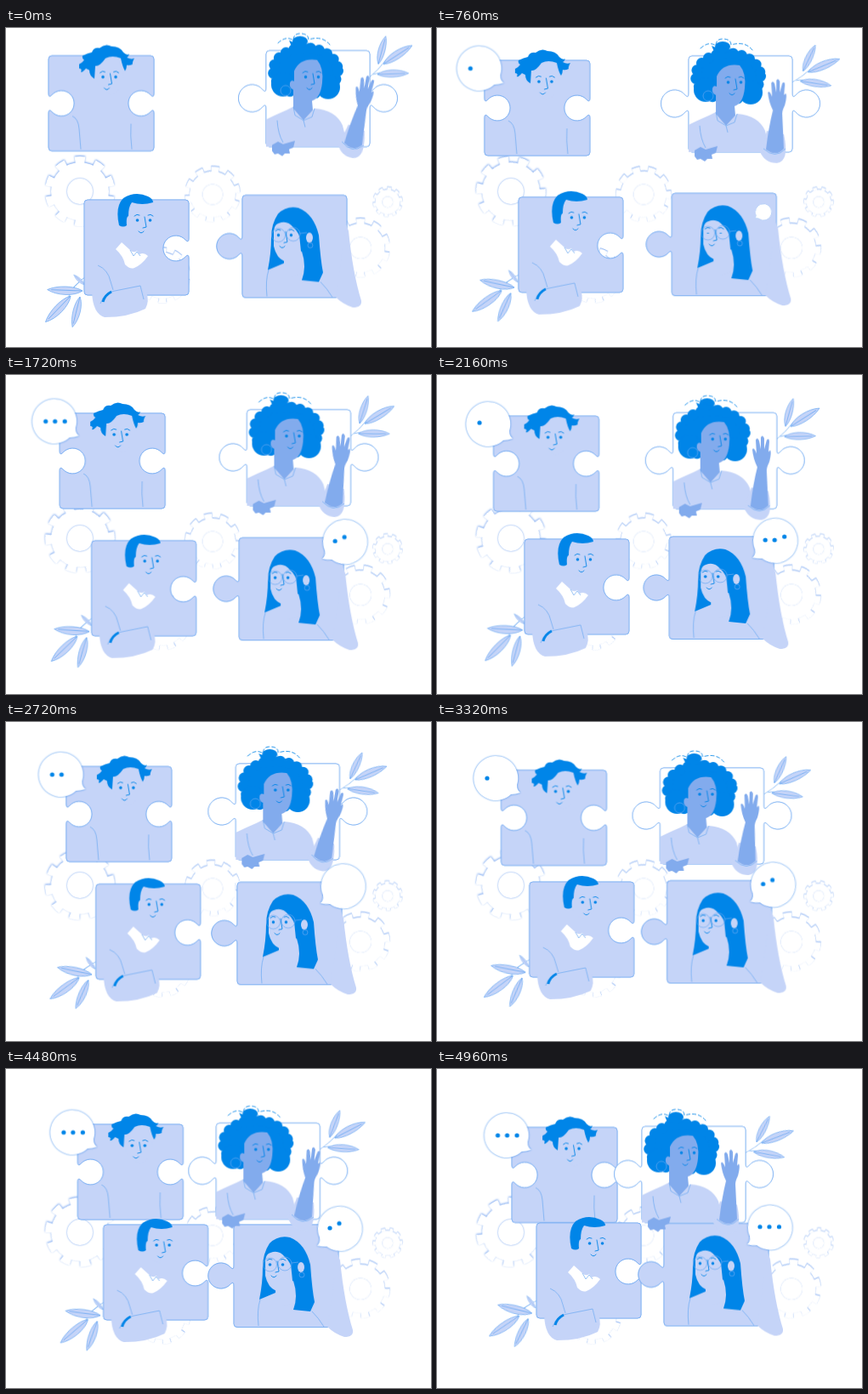
An HTML page without scripts that plays this animation: 500x375 px, repeating every 5000 ms.

```html
<!DOCTYPE html>
<html lang="en">
<head>
<meta charset="utf-8">
<title>Puzzle team</title>
<style>
  :root { --light: #c5d4f8; --skin: #82abed; --blue: #0085e8; --edge: #6aa9f3; --shade: #79a6f0; }
  html, body { margin: 0; height: 100%; overflow: hidden; background: #fff; }
  svg { display: block; width: 100vw; height: 100vh; }

  .light { fill: var(--light); }
  .skin { fill: var(--skin); }
  .hair { fill: var(--blue); }
  .white { fill: #fff; }
  .line { fill: none; stroke: var(--blue); stroke-width: .9; stroke-linecap: round; stroke-linejoin: round; }
  .thin { fill: none; stroke: var(--edge); stroke-width: .7; }
  .piece { stroke: var(--edge); stroke-width: .7; filter: drop-shadow(0 0 .5px var(--shade)); }
  .leaf { fill: var(--light); stroke: var(--edge); stroke-width: .6; }
  .gear { filter: drop-shadow(.5px -.8px .8px var(--shade)); }
  .hub { fill: #fff; filter: drop-shadow(.6px .6px .9px var(--shade)); }
  .bubble { fill: #fff; filter: drop-shadow(0 0 .8px #2f83ea); }

  /* Each piece drifts from its start toward the assembled puzzle. */
  .drift { animation: drift 5s linear infinite; }
  @keyframes drift { to { transform: translate(var(--dx), var(--dy)); } }

  .spin { animation: spin 5s linear infinite; }
  .back { animation-direction: reverse; }
  @keyframes spin { to { transform: rotate(150deg); } }

  .sway { animation: sway 5s cubic-bezier(.37, 0, .63, 1) infinite; }
  @keyframes sway {
    0%, 40%, 80% { transform: none; }
    20%, 60%, 100% { transform: rotate(12deg); }
  }

  .wave { transform-origin: 100px 115px; animation: wave 5s cubic-bezier(.37, 0, .63, 1) infinite; }
  @keyframes wave {
    0%, 28%, 56%, 84% { transform: rotate(10deg); }
    14%, 42%, 70%, 98%, 100% { transform: none; }
  }

  .blink { animation: blink 5s var(--at) infinite; }
  @keyframes blink {
    0%, 3.2% { transform: scaleY(.25); }
    3.21%, 100% { transform: none; }
  }

  .pop-early { transform-origin: 27px 18px; animation: pop-early 5s ease-out infinite; }
  .pop-late { transform-origin: -26px 28px; animation: pop-late 5s linear infinite; }
  @keyframes pop-early { 0%, 1% { transform: scale(0); } 7%, 100% { transform: none; } }
  @keyframes pop-late { 0%, 13.4% { transform: scale(0); } 18.4%, 100% { transform: none; } }

  /* Dots drop in one after another, then clear together. */
  .dots circle { fill: var(--blue); animation: dot1 5s linear infinite; }
  .dots circle:nth-child(2) { animation-name: dot2; }
  .dots circle:nth-child(3) { animation-name: dot3; }
  .dots.late circle { animation-delay: -4.16s; }
  .late { animation: reveal 5s step-end infinite; }
  @keyframes reveal { 0% { opacity: 0; } 20% { opacity: 1; } }
  @keyframes dot1 {
    0%, 35%, 63.8% { opacity: 0; animation-timing-function: step-end; }
    9%, 41%, 64.4% { opacity: 1; transform: translateY(-6px); }
    12%, 34.99%, 44%, 63.79%, 66%, 100% { opacity: 1; transform: none; }
  }
  @keyframes dot2 {
    0%, 35%, 63.8% { opacity: 0; animation-timing-function: step-end; }
    17%, 49%, 72.6% { opacity: 1; transform: translateY(-6px); }
    20%, 34.99%, 52%, 63.79%, 75.6%, 100% { opacity: 1; transform: none; }
  }
  @keyframes dot3 {
    0%, 35%, 63.8% { opacity: 0; animation-timing-function: step-end; }
    25.4%, 57%, 80.2% { opacity: 1; transform: translateY(-6px); }
    28.4%, 34.99%, 60%, 63.79%, 82.2%, 100% { opacity: 1; transform: none; }
  }
</style>
</head>
<body>
<svg viewBox="0 0 500 375">
  <defs>
    <g id="gear">
      <circle class="white" r="34"/>
      <circle r="37" fill="none" stroke="#fff" stroke-width="8" pathLength="20" stroke-dasharray="1 1" stroke-dashoffset=".5" transform="rotate(-90)"/>
    </g>
    <circle id="hub" class="hub" r="15"/>

    <g id="leaf">
      <path class="leaf" d="M0 0C8-6 26-6 36 0C26 5 8 5 0 0Z"/>
      <path class="thin" d="M0 0H32"/>
    </g>

    <g id="eyes" class="hair"><circle cx="-7.5" r="1.8"/><circle cx="7.5" r="1.8"/></g>
    <path id="features" class="line" d="M-11-5q3-3 6-1M5-6q3-2 6 1M1-4L3 8-1 9M-6 13q3 4 6 0"/>

    <path id="bubble" class="bubble" d="M24 9A26 26 0 1 0 17 20Q22 20 28 18Q24 15 24 9Z"/>
  </defs>

  <g id="gears">
    <g class="gear" transform="translate(87 192)"><use href="#gear" class="spin"/><use href="#hub"/></g>
    <g class="gear" transform="translate(243 195.5) scale(.8)"><use href="#gear" class="spin back"/><use href="#hub"/></g>
    <g class="gear" transform="translate(184 291) scale(.8)"><use href="#gear" class="spin"/></g>
    <g class="gear" transform="translate(417 258.5) scale(.85)"><use href="#gear" class="spin"/><use href="#hub"/></g>
    <g class="gear" transform="translate(449 204.5) scale(.43)"><use href="#gear" class="spin back"/><use href="#hub"/></g>
  </g>

  <!-- man, top left -->
  <g transform="translate(50 32.5)">
    <g class="drift" style="--dx:38.3px;--dy:36.3px">
      <path class="piece light" d="M4 0H120q4 0 4 4V44c0 5-2 4-4 2a15 15 0 1 0 0 20c2-2 4-3 4 2V108q0 4-4 4H4q-4 0-4-4V68c0-5 2-4 4-2a15 15 0 1 0 0-20c-2 2-4 3-4-2V4q0-4 4-4Z"/>
      <path class="thin" d="M28 71Q35 74 36 86L38 110M97 80Q96 94 98 110"/>
      <path class="light" d="M54 2H88V18Q88 40 74 46Q58 42 54 22Z"/>
      <path class="hair" d="M36 10Q40 8 42 5Q39 3 40 0Q46-3 51-4Q53-10 60-9Q67-15 74-11Q84-11 88-4Q92 0 95-2Q94 1 92 2Q97 5 101 3Q98 8 99 10Q95 12 92 11Q92 15 90 18Q87 13 85 3Q75-1 67 3Q60 13 55 12L54 27Q48 24 48 17L44 15Q40 20 38 19Q40 15 36 15Z"/>
      <use href="#eyes" transform="translate(71.5 25)"/>
      <use href="#features" transform="translate(71.5 25)"/>
      <g transform="translate(-5.5 8.5)">
        <g class="pop-early">
          <use href="#bubble"/>
          <g class="dots"><circle cx="-11" cy="1" r="2.6"/><circle cy="1" r="2.6"/><circle cx="11.5" cy="1" r="2.6"/></g>
        </g>
      </g>
    </g>
  </g>

  <!-- man, bottom left -->
  <g transform="translate(92 202)">
    <g class="drift" style="--dx:25.2px;--dy:-21.2px">
      <g transform="translate(0 91)">
        <g class="sway">
          <path class="thin" d="M4-2Q-12 7-20 26M-4 4L-14 13"/>
          <use href="#leaf" transform="translate(-16 22) rotate(134) scale(1.18)"/>
          <use href="#leaf" transform="translate(-2 16) rotate(-178) scale(1.15)"/>
          <use href="#leaf" transform="translate(-5 23) rotate(104) scale(1.02)"/>
          <use href="#leaf" transform="translate(1 9) rotate(-138) scale(.5)"/>
        </g>
      </g>
      <path class="piece light" d="M4 0H119q4 0 4 4V45c0 5-2 4-4 2a15 15 0 1 0 0 20c2-2 4-3 4 2V108q0 4-4 4H4q-4 0-4-4V4q0-4 4-4Z"/>
      <path class="light" d="M9 108Q10 134 24 138Q52 138 72 128Q77 119 73 108Z"/>
      <path class="light" d="M50 0H78V24Q76 42 66 45Q54 42 50 30Z"/>
      <path class="hair" d="M41 30Q36 8 46-2Q60-11 75-4Q81-1 81 3Q68 7 56 3Q52 8 52 19Q49 20 50 30Q46 33 41 30Z"/>
      <use href="#eyes" class="blink" x="0" style="--at:1.24s;transform-origin:70px 24px" transform-origin="70 24" visibility="hidden"/>
      <g transform="translate(70 24)">
        <g class="blink" style="--at:1.24s"><use href="#eyes"/></g>
        <use href="#features"/>
      </g>
      <path class="white" d="M37 58L44 50 54 59Q58 63 62 60L65 64Q70 61 75 66Q68 76 59 80Q54 82 48 76Q46 66 37 58Z"/>
      <path class="thin" d="M54 59L58 66 62 61 66 66"/>
      <path class="thin" d="M16 77Q28 82 31 96L34 106M19 122Q24 108 36 107L66 101 70 117"/>
      <path d="M22 120Q24 112 32 108" fill="none" stroke="#0085e8" stroke-width="3"/>
    </g>
  </g>

  <!-- woman with glasses, bottom right -->
  <g transform="translate(278 196.5)">
    <g class="drift" style="--dx:-11.1px;--dy:-15.1px">
      <path class="piece light" d="M4 0H119q4 0 4 4V116.5q0 4-4 4H4q-4 0-4-4V72c0-5-2-4-4-2a15 15 0 1 1 0-20c2 2 4 3 4-2V4q0-4 4-4Z"/>
      <path class="light" d="M122 34L125 42Q130 92 140 124Q141 132 130 132Q118 128 110 120Z"/>
      <path class="hair" d="M30 88Q34 68 34 50Q34 34 42 22Q52 12 66 15Q84 22 90 47Q92 76 95 91L90 102 70 100Q76 84 70 66L60 72 49 76 49 80Z"/>
      <path class="light" d="M37 42Q38 34 43 33Q53 29 60 38Q68 44 68 56L69 66Q72 78 70 92L58 96 50 78Q40 74 37 60Z"/>
      <ellipse class="light" cx="79" cy="50" rx="4" ry="6"/>
      <g transform="translate(50 47)">
        <g class="blink" style="--at:.68s"><use href="#eyes"/></g>
        <use href="#features"/>
      </g>
      <g class="thin">
        <circle cx="42.5" cy="47" r="8"/><circle cx="60" cy="46" r="8"/>
        <path d="M68 45L76 44"/><circle cx="80" cy="59" r="3"/>
      </g>
      <path class="thin" d="M31 88Q27 100 29 119M92 102Q100 110 106 120"/>
    </g>
  </g>

  <!-- curly-haired woman, top right -->
  <g transform="translate(306 26.5)">
    <g class="drift" style="--dx:-65.5px;--dy:41.3px">
      <g transform="translate(122 31)">
        <g class="sway">
          <path class="thin" d="M0 0Q10-8 19-20M4-3L12-5"/>
          <use href="#leaf" transform="translate(10 -15) rotate(-75) scale(.95)"/>
          <use href="#leaf" transform="translate(16 -15) rotate(-33) scale(1.12)"/>
          <use href="#leaf" transform="translate(9 -3) rotate(-2) scale(1.02)"/>
        </g>
      </g>
      <path class="piece white" d="M4 0H118q4 0 4 4V44c0 5 2 4 4 2a16 16 0 1 1 0 20c-2-2-4-3-4 2V109q0 4-4 4H4q-4 0-4-4V68c0-5-2-4-4-2a16 16 0 1 1 0-20c2 2 4 3 4-2V4q0-4 4-4Z"/>
      <ellipse cx="46.5" cy="24" rx="38" ry="27" fill="#0085e8" stroke="#0085e8" stroke-width="13" stroke-linecap="round" stroke-dasharray="0 10"/>
      <circle class="hair" cx="73" cy="43" r="14"/>
      <circle class="hair" cx="20" cy="40" r="14"/>
      <ellipse class="hair" cx="40" cy="-11" rx="9" ry="6"/>
      <path class="hair" d="M27-12Q34-8 38-12Q46-4 50-10Q48-3 42-4L30-5Z"/>
      <path class="line" stroke-dasharray="4 3" d="M14-9Q24-18 32-12Q32-20 40-20Q50-20 50-13Q66-18 75-7"/>
      <path class="light" d="M0 113V81Q10 76 24 70L32 66 44 82 57 68Q82 70 90 88L96 113Z"/>
      <path class="skin" d="M33 24Q40 8 60 11Q68 20 66 38Q64 56 54 59L55 70 44 82 32 68V46Q27 44 28 38Q29 34 33 36Z"/>
      <circle class="thin" cx="23" cy="47" r="6"/>
      <use href="#eyes" transform="translate(54 31)"/>
      <use href="#features" transform="translate(54 31)"/>
      <path class="thin" d="M32 66L34 76 44 82 54 78 57 68M44 82L46 90M13 82Q14 98 20 108"/>
      <path class="skin" d="M7 111L14 107 20 110 34 106 32 114 27 116 28 121 22 121 19 124 14 121 10 122 7 118Z"/>
      <g class="wave">
        <path class="light" d="M84 113Q90 96 92 88L112 92Q119 124 104 126Q90 126 84 113Z"/>
        <path class="skin" d="M91 110Q94 84 99 64Q94 54 93 43Q95 40 98 48L97 32Q99 28 101 33L103 43 103 29Q105 25 107 30L107 43 110 32Q113 29 113 34L112 46 114 44Q116 46 113 58Q110 64 110 68L112 109Q103 119 91 110Z"/>
        <path class="thin" d="M88 109Q102 122 114 109"/>
      </g>
    </g>
  </g>

  <!-- second speech bubble -->
  <g transform="translate(278 196)">
    <g class="drift" style="--dx:-11.1px;--dy:-15.1px">
      <g transform="translate(124 4.5)">
        <g class="pop-late">
          <use href="#bubble" transform="scale(-1 1) rotate(6)"/>
          <g class="dots late"><circle cx="-11" r="2.6"/><circle r="2.6"/><circle cx="11.5" r="2.6"/></g>
        </g>
      </g>
    </g>
  </g>
</svg>
</body>
</html>
```
